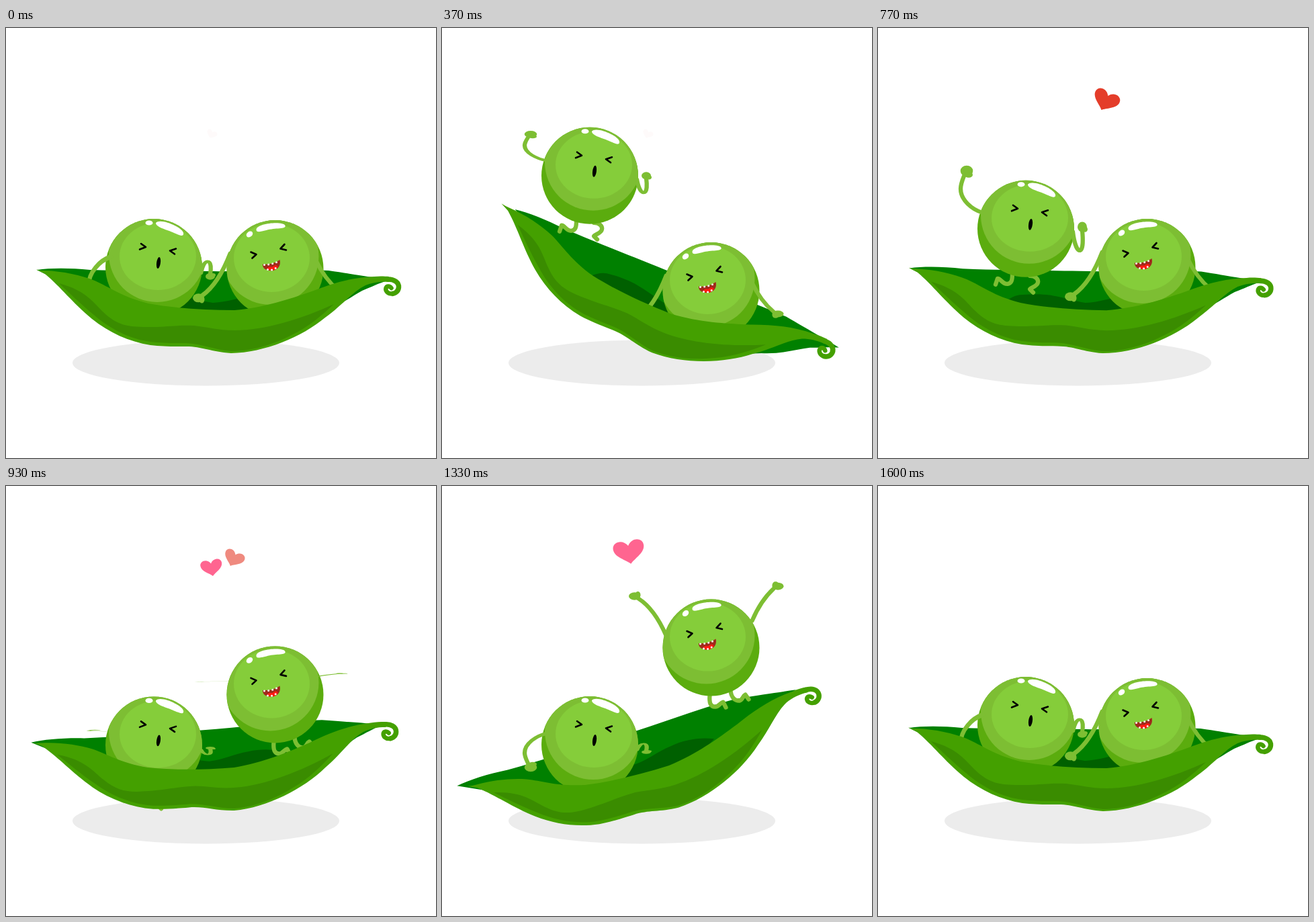
An HTML page for the animation above (1630 ms loop, 640 by 640 pixels).

```html
<!DOCTYPE html>
<html lang="en">
<head>
<meta charset="utf-8">
<title>Peas on a seesaw pod</title>
<style>
  html, body { margin: 0; width: 100%; height: 100%; overflow: hidden; background: #fff; }
  svg { display: block; width: 100vw; height: 100vh; }
  .base { fill: #5bac0e; }
  .mid, .limb ellipse { fill: #7dbe33; }
  .light { fill: #85cd3a; }
  .shine { fill: #fff; }
  .limb path { fill: none; stroke: #7dbe33; stroke-width: 6.3; stroke-linecap: round; stroke-linejoin: round; }
  .eye { fill: none; stroke: #000; stroke-width: 2.6; stroke-linecap: round; stroke-linejoin: round; }
</style>
</head>
<body>
<svg viewBox="0 0 640 640">
  <defs>
    <clipPath id="ball"><circle r="72"/></clipPath>
    <path id="heart" d="M0 18C-6 11-23 5-23-7C-23-18-7-21 0-9C7-21 23-18 23-7C23 5 6 11 0 18Z"/>
  </defs>

  <ellipse cx="297.5" cy="498.5" rx="198.5" ry="34" fill="#ececec"/>

  <g id="back">
    <path fill="#008000" d="M46 360C66 357 95 357 125 360C190 362 240 361 300 362S420 358 480 361C520 367 545 371 570 375C552 381 545 385 530 391C510 402 495 415 466 425C430 442 380 450 340 450C280 450 225 442 180 430C145 418 115 396 84 379Z"/>
    <path fill="#006000" d="M187 411C195 403 204 398 214 398C235 396 250 397 260 399C280 402 292 407 308 409C330 408 345 401 367 399C390 396 412 399 432 408C400 432 240 440 187 411Z"/>
  </g>

  <g id="left">
    <g class="limb">
      <path d="M-20 67C-20 76-21 81-27 82C-35 83-37 74-42 74L-45 83"/>
      <path d="M6 70C14 70 19 75 18 80C17 86 8 87 6 90L11 95"/>
    </g>
    <circle class="base" r="72"/>
    <g clip-path="url(#ball)">
      <circle class="mid" cx="5" cy="-20" r="72"/>
      <ellipse class="light" cx="6" cy="-16" rx="57" ry="50"/>
    </g>
    <ellipse class="shine" cx="-7" cy="-66" rx="5.5" ry="3.6"/>
    <path class="shine" d="M3-66C7-71 22-67 31-62C39-58 45-53 44-49C43-45 37-48 30-51C20-56 3-59 3-66Z"/>
    <path class="eye" d="M-19-35L-12-30L-21-26.5M33-27.5L24-24.5L31-19.5"/>
    <ellipse cx="7" cy="-6.5" rx="2.9" ry="8.5" transform="rotate(8 7 -6.5)"/>
    <g class="limb" id="leftArmA">
      <path d="M2-4C-14-9-31-24-31-42C-31-49-29-54-26-62"/>
      <ellipse cx="-22" cy="-70" rx="9.3" ry="8.5"/>
      <ellipse cx="-19" cy="-64" rx="6" ry="4.5"/>
    </g>
    <g class="limb" id="leftArmB">
      <path d="M0-3C2 14 6 26 10 26C16 26 15 6 14-5"/>
      <ellipse cx="14" cy="-10.5" rx="7" ry="8"/>
      <ellipse cx="18" cy="-7" rx="4" ry="4.5"/>
    </g>
  </g>

  <g id="right">
    <g class="limb">
      <path d="M-2 71C-3 82-1 88 6 88C12 88 13 82 18 81L22 89"/>
      <path d="M29 64C30 74 35 79 42 79C47 78 47 72 51 70L56 77"/>
    </g>
    <circle class="base" r="72"/>
    <g clip-path="url(#ball)">
      <circle class="mid" cx="-7" cy="-18" r="72"/>
      <ellipse class="light" cx="-5" cy="-16" rx="56.5" ry="51"/>
    </g>
    <ellipse class="shine" cx="-38" cy="-51" rx="5.2" ry="3.9" transform="rotate(-38 -38 -51)"/>
    <path class="shine" d="M-28-58C-27-68 13-71 15-64C17-58 0-61-13-57C-22-55-28-53-28-58Z"/>
    <path class="eye" d="M-36-24.5L-28-21L-34-15.5M14-36L8-29.5L16.5-27.5"/>
    <path fill="#9f2a1c" d="M-18.5-6.5Q-4-5 7-13C9-5 5 1-3 3C-11 4-19 1-18.5-6.5Z"/>
    <path fill="#ff1a12" d="M-12 0C-8-5-5 0-2-4C2-6 4-4 4-2C2 1-1 2-3 2.8C-7 3.5-10 2-12 0Z"/>
    <path stroke="#fff" stroke-width="3" stroke-linecap="round" stroke-dasharray="0 6.2" fill="none" d="M-16-5.5Q-5-5.5 5.5-11M-11 1.5Q-4 4 3-2.5"/>
    <g class="limb" id="rightArmA">
      <path d="M-1 2C-9-18-22-44-42-58"/>
      <ellipse cx="-48" cy="-62" rx="8.5" ry="6.3"/>
      <ellipse cx="-43" cy="-64" rx="4" ry="5.5"/>
    </g>
    <g class="limb" id="rightArmB">
      <path d="M1-16C8-34 19-54 33-68"/>
      <ellipse cx="39.5" cy="-72" rx="8.5" ry="6"/>
      <ellipse cx="36" cy="-74" rx="5" ry="5.5"/>
    </g>
  </g>

  <g id="front">
    <path fill="#44a000" d="M45 359.5Q52 361 58 361C85 362 112 368 132 376C155 386 172 400 212 410C250 417 295 420 340 420C385 416 420 404 455 392C485 380 515 371 548 370C556 369 564 369.5 570 370L570 378C556 377 545 379 535 383C515 393 500 413 475 431C440 460 385 483 335 484C305 482 292 474 268 474C245 474 232 474 215 472C183 467 153 453 128 433C98 408 82 386 58 366Z"/>
    <path fill="none" stroke="#44a000" stroke-width="7.5" d="M566 374C578 373 585 379 584.5 386C584 392 579 395.5 574 395.5"/>
    <path fill="none" stroke="#44a000" stroke-width="6.5" stroke-linecap="round" d="M575 395.5C568 396 564.5 391 565.5 387C567 383.5 571 384 573.5 387"/>
    <path fill="#3a8c00" d="M79 380C120 391 130 409 145 423C165 442 180 445 210 445C240 445 255 442 280 443C300 445 315 450 340 450C385 450 440 433 488 411C470 428 450 445 425 457C390 475 360 481 335 481C310 479 292 470 268 469C245 469 232 469 215 467C185 463 155 448 132 428C110 410 95 395 79 380Z"/>
  </g>

  <use id="red" href="#heart" fill="#e43d2a"/>
  <use id="pink" href="#heart" fill="#ff6590"/>
</svg>
<script>
// Time runs in 40 ms frames: half a swing is 20 of them.
const LOOP = 1630, STEP = 40, HALF = 20, SWING = 22;

const put = (id, value) => document.getElementById(id).setAttribute('transform', value);
const clamp = v => Math.min(1, Math.max(0, v));
const smooth = s => s * s * (3 - 2 * s);
const mix = (a, b, s) => a + (b - a) * s;

// Eases from one [frame, value] key to the next, resting at each.
const glide = (...keys) => f => keys.reduce((v, [end, to], i) => {
  const start = i ? keys[i - 1][0] : end - 1;
  return mix(v, to, smooth(clamp((f - start) / (end - start))));
}, keys[0][1]);

const leftY = glide([0, 356], [12.5, 187.5], [25.2, 402.5], [28, 402.5], [40, 356]);
const rightY = glide([0, 358], [9, 391], [13, 391], [19, 356], [29.9, 206.5], [40, 358]);
const leftWave = glide([0, -1.12], [12.5, 1], [18, 1], [27, -.66], [30, -.67], [40, -1.12]);
const rightWave = glide([0, -1.03], [19, -1.03], [27, 1], [32, 1], [40, -1.03]);

// Right side down, level, left side down, level.
function tilt(f) {
  const angle = SWING * (1 - Math.cos(2 * Math.PI * f / HALF)) / 2;
  return f < HALF ? angle : -angle;
}

// An arm mirrors about its shoulder: 1 is up, negative is down.
function arm(id, x, y, flip) {
  put(id, `translate(${x} ${y}) scale(1 ${flip})`);
}

// A heart drifts out with a slowing pace, grows, then shrinks away.
function heart(f, { id, born, rise, fades, from, to, size, turn, ghost }) {
  const drift = 1 - (1 - clamp((f - born) / rise)) ** 2;
  const grow = clamp((f - born) / 6), fade = clamp((f - fades) / 5);
  const [x, y] = from.map((v, i) => mix(v, to[i], drift));
  const alpha = Math.max(Math.min(2 * grow, 1 - fade), f < born + 15 ? ghost : 0);
  put(id, `translate(${x} ${y}) rotate(${turn}) scale(${size * mix(.4, 1, grow) * mix(1, .45, fade)})`);
  document.getElementById(id).setAttribute('opacity', alpha);
}

const hearts = [
  { id: 'red', born: 13, rise: 6, fades: 21, from: [306, 158], to: [339, 108], size: .86, turn: 25, ghost: .025 },
  { id: 'pink', born: 20, rise: 13, fades: 33, from: [325, 138], to: [278.5, 98], size: 1, turn: -9, ghost: 0 }
];

function draw() {
  const t = performance.now() % LOOP;
  const f = Math.min(2 * HALF, Math.floor((t + 12) / STEP));
  const angle = tilt(f), left = leftWave(f), right = rightWave(f);

  put('front', `rotate(${angle} 326 425)`);
  put('back', `rotate(${angle} 315 480)`);
  put('left', `translate(220 ${leftY(f)})`);
  put('right', `translate(400.5 ${rightY(f)})`);

  arm('leftArmA', -66, -20, left);
  arm('leftArmB', 70, 7.4, mix(1, left, .76));
  arm('rightArmA', -66, -20, right);
  arm('rightArmB', 60, -25, mix(1, right, .9));

  hearts.forEach(h => heart(f, h));
  requestAnimationFrame(draw);
}
draw();
</script>
</body>
</html>
```
